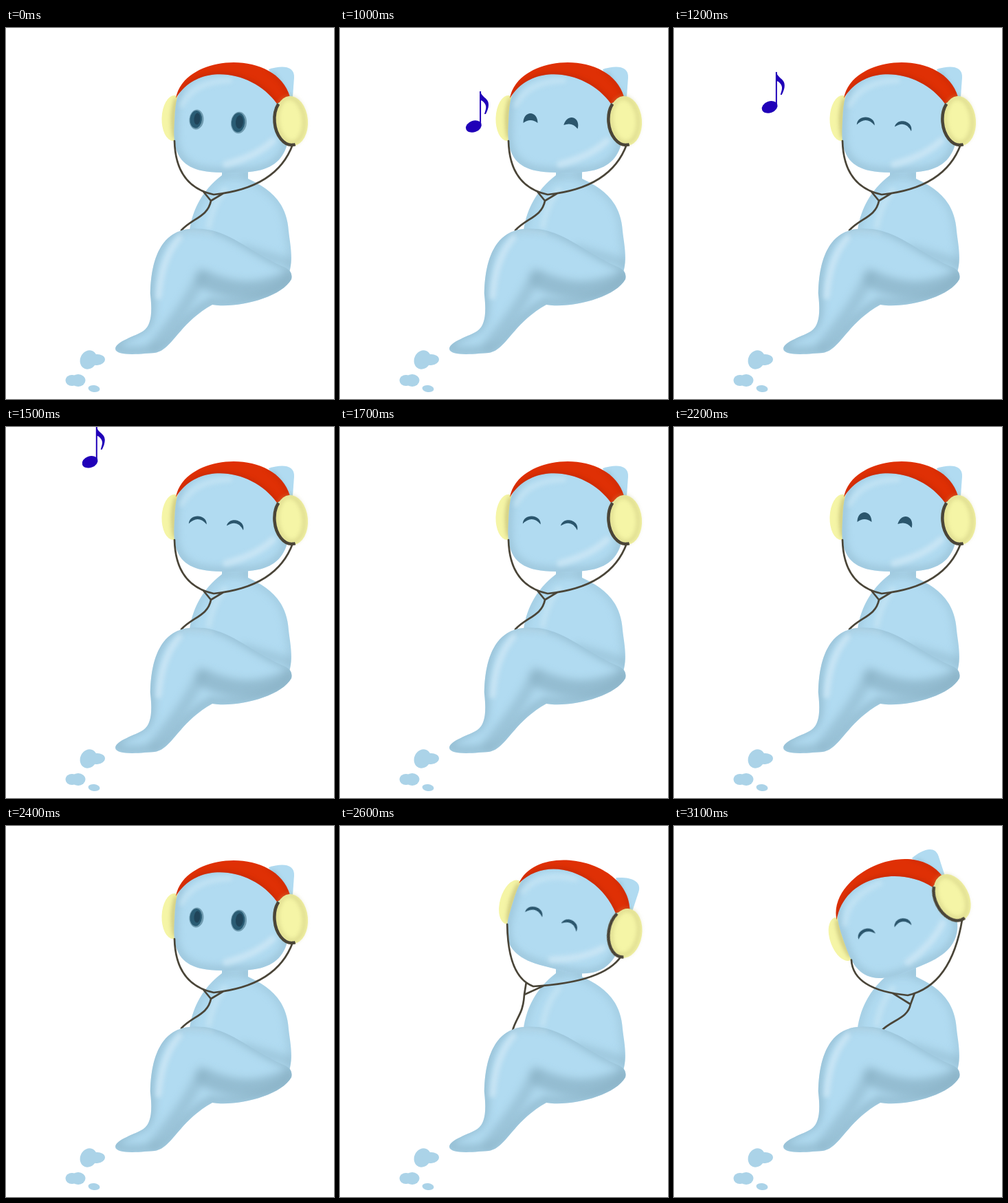
An HTML page for the animation above (3.6 s loop, 477x539 px).

```html
<!DOCTYPE html>
<html lang="en">
<head>
<meta charset="utf-8">
<title>Listening</title>
<style>
html, body { margin: 0; width: 100%; height: 100%; overflow: hidden; background: #fff; }
svg { display: block; width: 100%; height: 100%; }
</style>
</head>
<body>
<svg id="stage" viewBox="0 0 477 539" xmlns="http://www.w3.org/2000/svg"></svg>
<script>
const LOOP = 3600;
const SKIN = '#b1dbf1', SHADE = '#88b0c4', LIGHT = '#d0e9f6';
const CORD = '#4a4538', CREAM = '#f5f5a6', OLIVE = '#b9b36c', EYE = '#2b566d';

const line = (d, color, width, opacity = 1) =>
  `<path d="${d}" fill="none" stroke="${color}" stroke-width="${width}" ` +
  `stroke-opacity="${opacity}" stroke-linecap="round" stroke-linejoin="round"/>`;
const oval = (x, y, rx, ry, tilt, attrs) =>
  `<ellipse cx="${x}" cy="${y}" rx="${rx}" ry="${ry}" transform="rotate(${tilt} ${x} ${y})" ${attrs}/>`;
const fill = color => `fill="${color}"`;
const soft = (inner, blur) => `<g filter="url(#blur${blur})">${inner}</g>`;

// Shade the lower right edge of an outline by sliding a blurred copy inward
const rim = (d, dx, dy, width, opacity) =>
  soft(`<g transform="translate(${-dx} ${-dy})">${line(d, SHADE, width, opacity)}</g>`, 6);

// A filled outline with painted shading kept inside it
let clips = 0;
function painted(d, color, inner) {
  const id = 'clip' + clips++;
  return `<clipPath id="${id}"><path d="${d}"/></clipPath>` +
    `<path d="${d}" fill="${color}"/><g clip-path="url(#${id})">${inner}</g>`;
}

// Rounded box whose underside leans to the left
function roundBox(cx, cy, rx, ry, power, lean) {
  const bend = v => Math.sign(v) * Math.abs(v) ** (2 / power);
  const pts = Array.from({ length: 90 }, (_, i) => {
    const a = i / 90 * 2 * Math.PI, y = ry * bend(Math.sin(a));
    return `${cx + rx * bend(Math.cos(a)) - lean * y} ${cy + y}`;
  });
  return `M${pts.join('L')}Z`;
}

const blurs = [0.7, 3, 6].map(n =>
  `<filter id="blur${Math.round(n)}" filterUnits="userSpaceOnUse" x="-50" y="-50" width="600" height="660" ` +
  `color-interpolation-filters="sRGB"><feGaussianBlur stdDeviation="${n}"/></filter>`).join('');

const torsoShape = 'M314 198V214C290 232 268 262 266 305L408 366C420 340 413 315 411 295C408 250 380 232 352 219V198Z';
const torso = painted(torsoShape, SKIN,
  rim(torsoShape, 0, 0, 9, .4) +
  soft(line('M345 322L414 342', SHADE, 14, .45) + line('M318 214H350', SHADE, 10, .45), 6) +
  soft(line('M318 236Q301 255 295 288', LIGHT, 9, .5), 3));

const legShape = 'M268 292C217 295 210 355 210 388C213 415 211 432 200 440C188 448 160 455 159 466' +
  'C160 478 200 473 216 472C242 468 250 430 300 402C335 408 400 392 415 365' +
  'C418 350 405 348 391 341C340 315 315 288 268 292Z';
const legs = painted(legShape, SKIN,
  rim(legShape, 1, 4, 13, .65) +
  soft(line('M284 358Q268 400 215 462', SHADE, 17, .5) + line('M290 366Q350 395 410 366', SHADE, 26, .7), 6) +
  soft(line('M252 305Q226 335 222 390', LIGHT, 9, .75) + line('M250 297Q275 291 300 299', LIGHT, 4, .4), 3));

const pebble = fill('#abd3e8');
const stones = oval(120, 482, 12, 14, 25, pebble) + oval(132, 482, 12, 8, -5, pebble) +
  oval(96, 512, 9.5, 8, 0, pebble) + oval(105, 512, 10.5, 9, 0, pebble) + oval(128, 524, 8.5, 5, 8, pebble);

const ear = painted('M382 60C400 54 420 54 419 72L417 100L400 108Z', SKIN,
  soft(line('M388 68L411 104', SHADE, 8, .6), 3));

const leftCup = oval(244, 131, 17.5, 33, 2, fill(CREAM)) +
  soft(line('M248 104Q240 130 246 158', OLIVE, 5, .9), 3);

const faceShape = roundBox(329, 135, 84, 75, 3.1, .05);
const face = painted(faceShape, SKIN,
  rim(faceShape, 0, 1, 9, .6) +
  soft(line('M320 198Q365 186 388 164', LIGHT, 10, .75) + line('M256 112Q272 78 325 76', LIGHT, 8, .55), 3));

const band = painted('M247 102C258 38 392 28 413 100L394 110C360 62 280 48 247 102Z', '#df3005',
  soft(line('M394 110C360 62 280 48 247 102', '#a92205', 4, .6) + line('M380 60Q402 76 412 100', '#b52406', 3, .6), 3));

const rightCup = oval(415, 135, 24, 36.2, -5, fill(CREAM)) +
  soft(oval(414, 134, 20, 33, -5, `fill="none" stroke="${OLIVE}" stroke-width="4" stroke-opacity=".55"`), 3) +
  soft(oval(414, 135, 23.5, 35, -5, `fill="none" stroke="${CORD}" stroke-width="4.5" ` +
    'pathLength="100" stroke-dasharray="42 58" stroke-dashoffset="-23"'), 1);

const openEye = (x, y, rx, ry) => oval(x, y, rx, ry, 5, fill('#6f9bb0')) +
  oval(x - .8, y - .3, rx - 1.8, ry - 1.8, 5, fill('#2a5c74')) + oval(x + 1, y - 1, rx - 6, ry - 6, 5, fill('#1f4459'));
const lid = (x, y, w, top, under, tilt) =>
  `<path transform="translate(${x} ${y}) rotate(${tilt})" fill="${EYE}" ` +
  `d="M${-w} 6C${-w} ${top} ${w} ${top} ${w} 6Q0 ${under} ${-w} 6Z"/>`;

const eyes = {
  open: openEye(277, 133, 10.5, 14.5) + openEye(338.5, 137.5, 11.5, 15.8),
  half: lid(277, 132, 10.5, -12.7, -2, 0) + lid(337, 138, 10.5, -12.7, -2, 15),
  shut: lid(279, 135, 13, -9.3, -8, 2) + lid(334.5, 141, 12.5, -9.3, -8, 15)
};

const note = `<g id="note" fill="#2000b8">${oval(11.4, 51, 11.8, 8.3, -20, '')}
  <rect x="20.1" width="2" height="51"/>
  <path d="M21 0C23 9 34 10 33 20Q33 25 29 33H27C29 26 31 22 27 17Q24 13 21 13Z"/></g>`;

const stage = document.getElementById('stage');
stage.innerHTML = `<defs>${blurs}</defs>${stones}${torso}
  <g id="head">${ear}${leftCup}${face}
    ${Object.keys(eyes).map(k => `<g id="eyes-${k}">${soft(eyes[k], 1)}</g>`).join('')}
    ${band}${rightCup}</g>
  ${soft(`<g id="cord">${line('', CORD, 2.7)}</g>`, 1)}${legs}${note}`;

const el = id => document.getElementById(id);
const show = (id, on) => { el(id).style.display = on ? '' : 'none'; };

// The head and the cord's upper ends turn about one pivot
const PIVOT = [330, 146];
const turn = ([x, y], degrees) => {
  const a = degrees * Math.PI / 180, dx = x - PIVOT[0], dy = y - PIVOT[1];
  return [PIVOT[0] + dx * Math.cos(a) - dy * Math.sin(a), PIVOT[1] + dx * Math.sin(a) + dy * Math.cos(a)];
};
const mix = (a, b, u, v) => [a[0] + (b[0] - a[0]) * u, a[1] + (b[1] - a[1]) * v];
const onCurve = (a, c, b, t) => mix(mix(a, c, t, t), mix(c, b, t, t), t, t);

// Two hanging strands meet, a small fork closes below them, a tail runs to the lap
function cordPath({ tilt, join, tip, end }) {
  const left = turn([245, 164], tilt), right = turn([417, 169], tilt);
  const sagL = mix(left, join, .03, .85), sagR = mix(right, join, .2, .87);
  return `M${left}Q${sagL} ${join}Q${sagR} ${right}` +
    `M${onCurve(left, sagL, join, .85)}L${tip}L${onCurve(right, sagR, join, .92)}` +
    `M${tip}C${mix(tip, end, .1, .55)} ${mix(tip, end, .65, .6)} ${end}`;
}

const poses = {
  calm: { tilt: 0, join: [302, 242], tip: [298, 251], end: [255, 294] },
  right: { tilt: 14, join: [281, 233], tip: [268, 245], end: [251, 297] },
  left: { tilt: -22, join: [340, 246], tip: [344, 259], end: [302, 297] }
};

const looks = [[0, 'open'], [1000, 'half'], [1200, 'shut'], [1800, 'half'], [1900, 'open'],
  [2200, 'half'], [2300, 'shut'], [2400, 'open'], [2600, 'shut']];
const noteTimes = [1000, 1200, 1400, 1500, 1600];

// The note slides left with a slowing drift while it rises faster and faster
function noteSpot(t) {
  const s = (noteTimes.findLast(n => n <= t) - 1000) / 1000;
  return [108 + 75 * Math.exp(-s / .15), 92 - 111 * s - 147 * s * s];
}

function draw(t) {
  const look = looks.findLast(l => l[0] <= t)[1];
  const pose = poses[t < 2600 ? 'calm' : t < 3100 ? 'right' : 'left'];
  for (const k in eyes) show('eyes-' + k, k === look);
  el('head').setAttribute('transform', `rotate(${pose.tilt} ${PIVOT})`);
  el('cord').firstChild.setAttribute('d', cordPath(pose));
  const playing = t >= 1000 && t < 1700;
  show('note', playing);
  if (playing) el('note').setAttribute('transform', `translate(${noteSpot(t)})`);
}

const begin = performance.now();
function tick() {
  draw((performance.now() - begin) % LOOP);
  requestAnimationFrame(tick);
}
tick();
</script>
</body>
</html>
```
